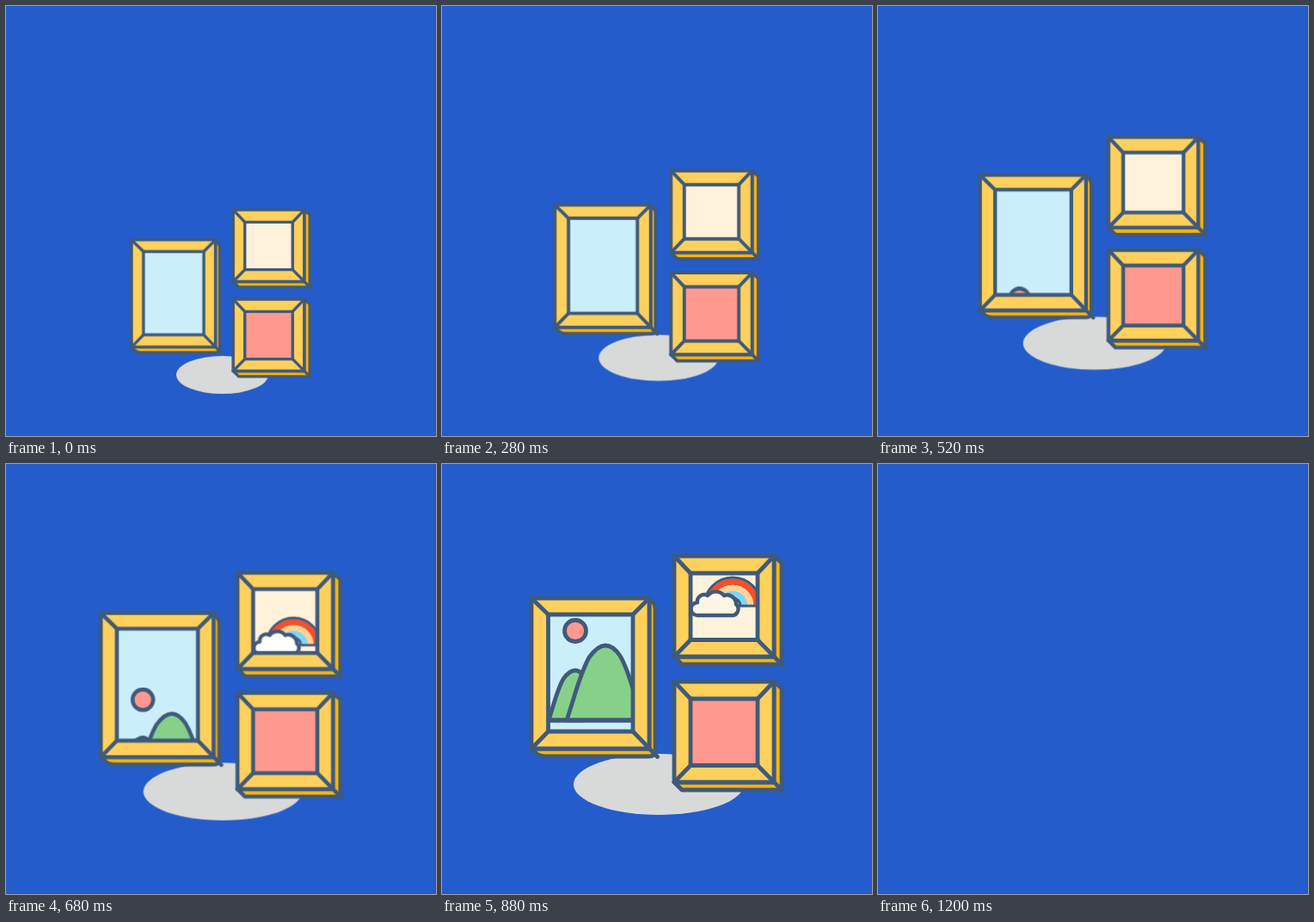
An HTML page without scripts that plays this animation: 500x500 px, repeating every 1.22 s.

```html
<!DOCTYPE html>
<html lang="en">
<head>
<meta charset="utf-8">
<title>Picture frames</title>
<style>
  html, body { margin: 0; width: 100%; height: 100%; overflow: hidden; background: #245dcb; }
  svg { display: block; width: 100%; height: 100%; }

  .line { stroke: #3f5a7a; stroke-width: 4.8; stroke-linejoin: round; stroke-linecap: round; }
  .front { fill: #ffd05c; fill-rule: evenodd; }
  .side { fill: #ffb30a; }
  .none { fill: none; }
  .hill { fill: #87d089; }
  .pink { fill: #ff998f; }
  .sky { fill: #cbeefb; }
  .cream { fill: #fff1da; }

  .scene, .shadow, .wall, .hills, .rainbow, .cloud { animation: 1220ms linear infinite; }
  .scene { animation-name: blink; animation-timing-function: step-end; }
  .shadow { animation-name: spread; transform-origin: 252px 372.5px; }
  .wall { animation-name: grow; transform-origin: 0 0; }
  .hills { animation-name: hills; }
  .rainbow { animation-name: rainbow; }
  .cloud { animation-name: cloud; }

  @keyframes blink {
    0% { visibility: visible; }
    98.361%, 100% { visibility: hidden; }
  }
  @keyframes spread {
    0% { transform: translate(-.5px, 56.5px) scale(.54, .62); }
    65.574%, 100% { transform: translate(0, 0) scale(1, 1); }
  }
  @keyframes grow {
    0% { transform: translate(71.9px, 161px) scale(.712); }
    65.574%, 100% { transform: translate(0, 0) scale(1); }
  }
  @keyframes hills {
    0%, 36.066% { transform: translateY(148.7px); }
    72.131%, 100% { transform: translateY(0); }
  }
  @keyframes rainbow {
    0%, 40.984% { transform: translateY(82px); }
    64.344%, 100% { transform: translateY(0); }
  }
  @keyframes cloud {
    0%, 57% { fill: #fff; }
    70%, 100% { fill: #fff5e4; }
  }
</style>
</head>
<body>
<svg viewBox="0 0 500 500">
  <defs>
    <clipPath id="tallClip"><rect x="123.5" y="175" width="98" height="136"/></clipPath>
    <clipPath id="squareClip"><rect x="289" y="127" width="78" height="77.5"/></clipPath>
    <g id="square" class="line">
      <path class="side" d="M386 107L395 115V233H279L270 224H386Z"/>
      <path class="front" d="M270 107H386V224H270ZM289 127V204.5H367V127Z"/>
      <path class="none" d="M270 107L289 127M386 107L367 127M270 224L289 204.5M367 204.5L396 234"/>
    </g>
  </defs>

  <g class="scene">
    <ellipse class="shadow" cx="252" cy="372.5" rx="99" ry="35.5" fill="#d8d9d9"/>

    <g class="wall">
      <rect class="sky" x="123" y="175" width="99" height="136"/>
      <g clip-path="url(#tallClip)">
        <g class="hills line">
          <path class="hill" d="M124 298C130 280 134 262 141 250Q148 240 155 240Q160 240 164 246V298Z"/>
          <path class="hill" d="M145 298C155 268 160 245 171 225Q181 211 190 211Q199 211 207 223C215 236 219 252 224 268V298Z"/>
          <path class="none" d="M118 298H228"/>
          <circle class="pink" cx="155" cy="194" r="12.5"/>
        </g>
      </g>
      <g class="line">
        <path class="side" d="M241 156Q248 162 248 168V333Q248 340 241 340H120Q111 340 104 331H241Z"/>
        <path class="front" d="M104 156H241V331H104ZM123.5 175V311H222V175Z"/>
        <path class="none" d="M104 156L123.5 175M241 156L222 175M104 331L123.5 311M222 311L250.5 340.5"/>
      </g>

      <rect class="cream" x="289" y="127" width="78" height="78"/>
      <g clip-path="url(#squareClip)">
        <g class="rainbow">
          <g class="none" stroke-width="7.6">
            <path stroke="#f4502c" d="M310 165a28 28 0 0 1 56 0"/>
            <path stroke="#ffd395" d="M317.5 165a20.5 20.5 0 0 1 41 0"/>
            <path stroke="#7fd5fa" d="M324.5 165a13.5 13.5 0 0 1 27 0"/>
          </g>
          <path class="line none" style="stroke-width:3" d="M305 165a33 33 0 0 1 66 0H347a9 9 0 0 0 -18 0"/>
          <path class="line cloud" style="stroke-width:4.4" d="M297 176A7.5 7.5 0 0 1 297 161A8 8 0 0 1 309 153A12 12 0 0 1 328 153A10.5 10.5 0 0 1 342 163A7.5 7.5 0 0 1 336 176Z"/>
        </g>
      </g>
      <use href="#square"/>

      <rect class="pink" x="289" y="273" width="78" height="78"/>
      <use href="#square" y="146"/>
    </g>
  </g>
</svg>
</body>
</html>
```
